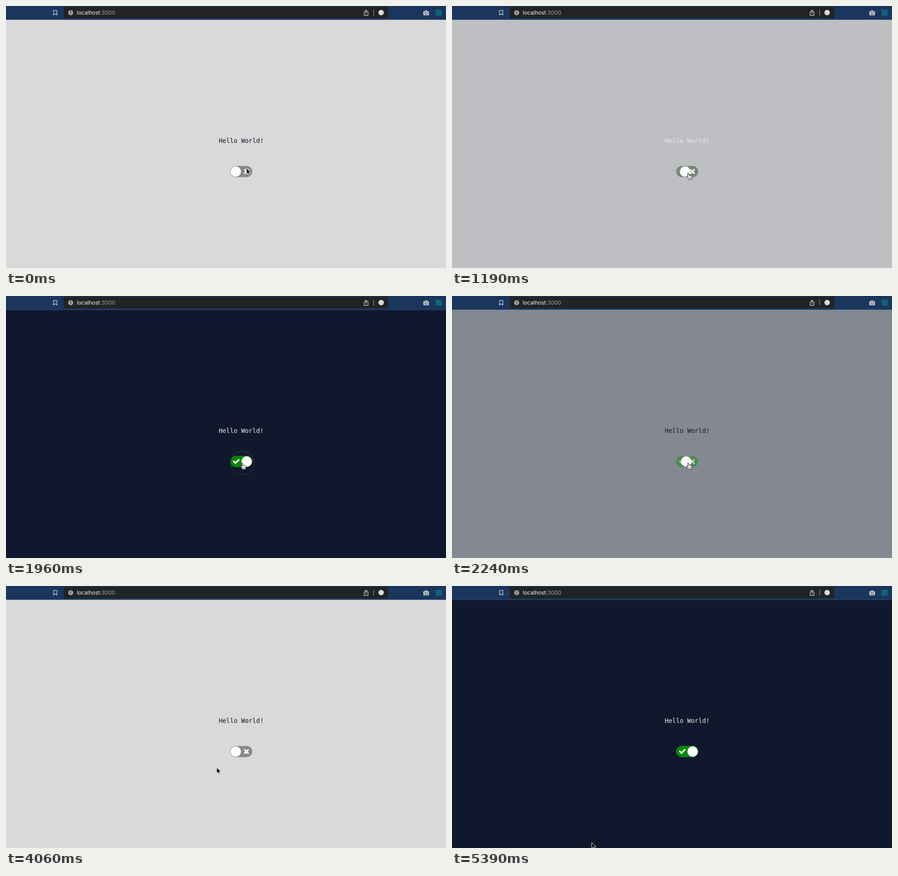
Write an HTML page that moves like this. It is 970x578 px and loops after 5530 ms.

```html
<!DOCTYPE html>
<html lang="en">
<head>
<meta charset="utf-8">
<title>Theme switch</title>
<style>
  html, body { margin: 0; width: 100%; height: 100%; overflow: hidden; background: #d9d9d9; }
  svg { display: block; width: 970px; height: 578px; }
  .url { font: 12px Inter, Roboto, sans-serif; fill: #f4f4f4; }
  .url tspan { fill: #a2a4a6; }
  #hello { font: 13.7px "DejaVu Sans Mono", monospace; }
  .line { fill: none; stroke: #d5dbe5; stroke-width: 1.2; stroke-linejoin: round; stroke-linecap: round; }
  .icon { fill: none; stroke: #fff; stroke-width: 3.5; }
</style>
</head>
<body>
<svg viewBox="0 0 970 578">
  <rect id="page" y="30" width="970" height="548"/>

  <g id="toolbar">
    <rect width="970" height="30" fill="#1b365d"/>
    <rect width="970" height="1" fill="#142a4b"/>
    <rect y="30" width="970" height="1" fill="#456a98" opacity=".6"/>
    <path class="line" d="M104.8 9.8H112.2V20L108.5 17 104.8 20Z"/>
    <rect x="127" y="2" width="716" height="25" rx="4" fill="#222324"/>
    <circle cx="142.6" cy="14.8" r="5.6" fill="#a0a2a4"/>
    <path d="M142.6 11.6V15.4M142.6 16.8V18.2" stroke="#222324" stroke-width="1.4"/>
    <text class="url" x="156" y="19">localhost<tspan>:3000</tspan></text>
    <path class="line" d="M791.8 13H789.6V20.6H798.2V13H796M793.9 17V9.4M791.6 11.5L793.9 9.2 796.2 11.5"/>
    <rect x="810" y="8" width="1" height="13" fill="#a5a7a9"/>
    <circle cx="827" cy="14.6" r="6" fill="#d9dadb"/>
    <rect x="923.5" y="9.8" width="5.4" height="4" rx="1" fill="#c9cbce"/>
    <rect x="920" y="11.5" width="12.4" height="9.1" rx="1.5" fill="#c9cbce"/>
    <circle cx="926.2" cy="15.8" r="2.5" fill="#e8e8e8" stroke="#565b64" stroke-width="1.4"/>
    <rect x="947" y="8" width="13.5" height="13.5" rx="1" fill="#0f6474"/>
  </g>

  <text id="hello" x="469" y="302">Hello World!</text>

  <rect id="track" x="494.4" y="352.9" width="48.4" height="24.5" rx="12.25" stroke="#888" stroke-opacity=".4" stroke-width=".8"/>
  <path id="check" class="icon" d="M501 363.8L505.9 368.6 514.1 360.4"/>
  <path id="cross" class="icon" d="M525.3 360.6L534.7 370M534.7 360.6L525.3 370"/>
  <circle id="knob" cx="506.5" cy="365.2" r="11.4" fill="#fff"/>

  <g id="moveX"><g id="moveY">
    <circle id="ring" r="26" fill="none" stroke="#333" stroke-width="2" stroke-opacity=".75"/>
    <path id="arrow" d="M0 0V13L3 10.2 5 14.8 7.2 13.9 5.2 9.4H9.3Z" stroke="#fff"/>
    <g id="hand" stroke="#000" stroke-linejoin="round">
      <path fill="#fff" d="M-1.6 1.2C-1.9-.6 .5-.8 .9 1L1.9 5.2C2.6 4.4 4 4.7 4.2 5.7 4.9 5 6.3 5.3 6.4 6.3 7.2 5.9 8.1 6.5 8.1 7.5L8 10.4C7.9 12 7 12.6 6.8 14.2H.6C.2 12.4-2.6 10.6-3.9 8.3-4.4 7.1-3.1 6.3-2 7.2L-.6 8.5Z"/>
      <path fill="none" stroke-width=".7" d="M1.7 9V12M3.6 9V12M5.5 9V12"/>
    </g>
  </g></g>
</svg>
<script>
const LOOP = 5530, STEP = 70;
const SMOOTH = "cubic-bezier(.4, 0, .2, 1)";
const animations = [];

// keys: { time, value, easing towards the next key }
function play(id, property, keys) {
  const frames = keys.map(({ time, value, easing }) =>
    ({ offset: time / LOOP, [property]: value, easing }));
  frames.push({ ...frames.at(-1), offset: 1 });
  const animation = document.getElementById(id).animate(frames, { duration: LOOP, fill: "both" });
  animation.pause();
  animations.push(animation);
}

// Eases through a list of moves, holding the value in between
function travel(id, property, first, moves) {
  let value = first;
  const keys = [{ time: 0, value }];
  for (const { start, end, to, easing } of moves) {
    keys.push({ time: start, value, easing }, { time: end, value: to });
    value = to;
  }
  play(id, property, keys);
}

// Flips between two values at the given times
function flip(id, property, values, times) {
  play(id, property, [0, ...times].map((time, i) =>
    ({ time, value: values[i % 2], easing: "step-end" })));
}

const clicks = [1130, 2125, 4562];
function toggle(id, property, values, { delay = 0, duration = 300, easing = SMOOTH } = {}) {
  travel(id, property, values[0], clicks.map((click, i) => ({
    start: click + delay, end: click + delay + duration, to: values[(i + 1) % 2], easing
  })));
}

toggle("page", "fill", ["#d9d9d9", "#10182d"]);
toggle("track", "fill", ["#888888", "#008800"]);
toggle("check", "opacity", [0, 1]);
toggle("cross", "opacity", [1, 0]);
toggle("knob", "transform", ["translateX(0px)", "translateX(24px)"],
  { delay: 10, duration: 250, easing: "ease-out" });
flip("hello", "fill", ["#10172a", "#eaebec"], [1120, 2170, 4620]);

const hover = [630, 2940, 4200, 5180];
flip("hand", "opacity", [0, 1], hover);
flip("arrow", "opacity", [1, 0], hover);
flip("ring", "opacity", [0, 1], [910, 980, 1960, 2100, 4340, 4480]);

// The vertical easing of the way back dips before it rises
const DIP = "cubic-bezier(.6, -1.2, .7, 1)";
const moves = [
  { start: 560, end: 770, x: 521, y: 368.4 },
  { start: 2850, end: 3290, x: 328, y: 404 },
  { start: 3710, end: 4270, x: 521, y: 361, easingY: DIP },
  { start: 4270, end: 4340, x: 535.6, y: 362 },
  { start: 5110, end: 5390, x: 308, y: 566 }
];
travel("moveX", "transform", "translateX(530px)", moves.map(({ start, end, x }) =>
  ({ start, end, to: `translateX(${x}px)`, easing: "ease-in-out" })));
travel("moveY", "transform", "translateY(358px)", moves.map(({ start, end, y, easingY = "ease-in-out" }) =>
  ({ start, end, to: `translateY(${y}px)`, easing: easingY })));

// The picture advances in equal steps
function tick() {
  const time = Math.floor(performance.now() % LOOP / STEP) * STEP;
  for (const animation of animations) animation.currentTime = time;
  requestAnimationFrame(tick);
}
tick();
</script>
</body>
</html>
```
